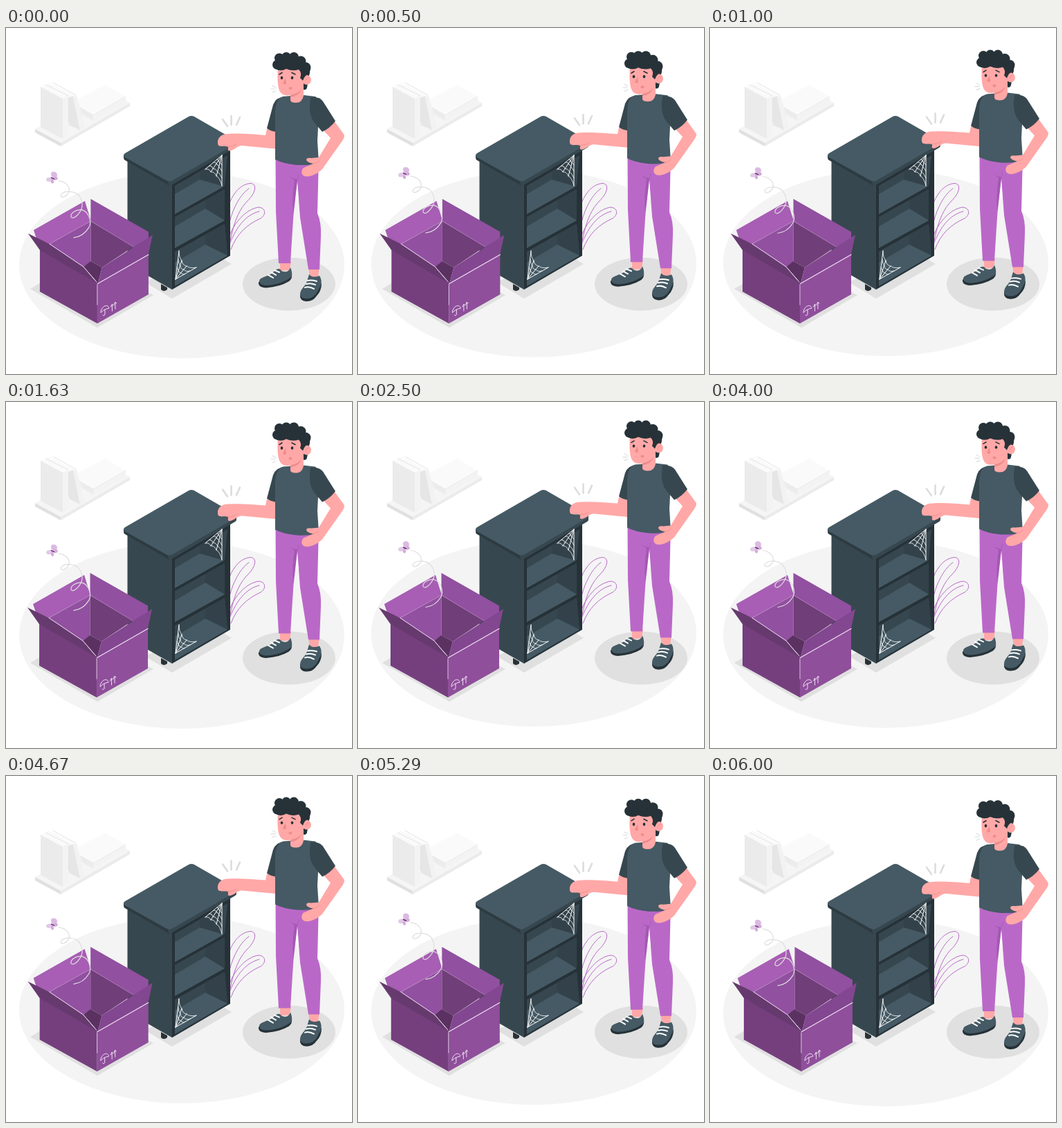
Recreate the animation shown at these times as an HTML page. Size 500 by 500 pixels, loop 6040 ms.

```html
<!DOCTYPE html>
<html lang="en">
<head>
<meta charset="utf-8">
<title>Old cabinet</title>
<style>
html, body { margin: 0; width: 100%; height: 100%; overflow: hidden; background: #fff; }
svg { display: block; width: 100vw; height: 100vh; }
.line { fill: none; stroke-linecap: round; stroke-linejoin: round; }
</style>
</head>
<body>
<svg viewBox="0 0 500 500">
  <ellipse id="ground" cx="254" cy="342.5" rx="235" ry="135" fill="#f4f4f4"/>

  <g id="bookshelf">
    <path fill="#f5f5f5" d="M42 146 142 88 179 108 79 166Z"/>
    <path fill="#e0e0e0" d="M42 146 79 166V171L42 151Z"/>
    <path fill="#ebebeb" d="M79 166 179 108V113L79 171Z"/>
    <path fill="#fafafa" d="M50 85 62 79 101 98 90 105 82 102Z"/>
    <path fill="#ebebeb" d="M50 85 82 102V160L50 143Z"/>
    <path fill="#f3f3f3" d="M82 102 90 98V155L82 160Z"/>
    <path class="line" stroke="#e4e4e4" d="M58 82 90 98M68 79 101 97"/>
    <path fill="#e2e2e2" d="M90 100 104 143 90 136Z"/>
    <path fill="#e6e6e6" d="M90 101 97 98 107 148 91 140Z"/>
    <path fill="#f2f2f2" d="M97 99 102 97 114 144 107 148Z"/>
    <path fill="#fafafa" d="M103 103 143 82 173 99 126 126 107 115Z"/>
    <path fill="#ececec" d="M107 115 126 126V134L109 124Z"/>
    <path fill="#f3f3f3" d="M126 126 173 99V108L126 134Z"/>
    <path class="line" stroke="#e8e8e8" stroke-width=".8" d="M107 115 126 126 173 99"/>
  </g>

  <path fill="#e0e0e0" d="M200 367 240 391 326 341 300 325Z"/>
  <path fill="#e0e0e0" d="M35 377 60 362 180 368 213 386 132 433Z"/>
  <ellipse cx="409" cy="370" rx="67" ry="38.5" fill="#e0e0e0"/>

  <g class="line" stroke="#ba68c8" stroke-width="1">
    <path d="M323 253C328 240 338 226 353 224.500 364 225 361 239 347 252 334 266 328 288 324 307"/>
    <path d="M323 281C328 260 339 240 351 232"/>
    <path d="M324 298C330 282 346 262 365 259 376 260 376 270 368 275 348 284 333 298 325 320"/>
    <path d="M324 310C333 288 346 270 366 265"/>
  </g>

  <g id="cabinet">
    <path fill="#263238" d="M224 370 233 375V378Q228 382 224 378Z"/>
    <path fill="#37474f" d="M175.500 190 240 226V378L175.500 341Z"/>
    <path fill="#263238" d="M240 222 324 176V329L240 378Z"/>
    <path fill="#37474f" d="M244 228 320 184 316 228 244 268Z"/>
    <path fill="#33424a" d="M280 207 312 188V228L280 220Z"/>
    <path fill="#455a64" d="M244 240 280 219 315 229 244 269Z"/>
    <path fill="#37474f" d="M244 273 316 233V278L244 318Z"/>
    <path fill="#33424a" d="M288 249 316 233V278L288 262Z"/>
    <path fill="#455a64" d="M244 287 288 261 316 278 244 318Z"/>
    <path fill="#37474f" d="M244 323 316 283 320 328 244 373Z"/>
    <path fill="#33424a" d="M288 299 316 283 320 328 288 313Z"/>
    <path fill="#455a64" d="M244 339 288 313 320 329 244 373Z"/>
    <path fill="#2d3b42" d="M170 183 236 220V228L172 191Q170 190 170 187Z"/>
    <path fill="#37474f" d="M234 221 333 164V170Q333 172 331 173L241 226Q238 228 235 227Z"/>
    <path fill="#455a64" d="M172 181 264 128Q268 126 272 128L331 162Q335 165 331 168L241 220Q236 223 231 220L172 187Q168 184 172 181Z"/>
    <g class="line" stroke="#fff" stroke-width="1">
      <path d="M312 184 288 204M312 184 296 208M312 184 304 214M312 184V228"/>
      <path stroke-width=".8" d="M294 199Q298 199 299 203 303 203 306 208 309 210 312 217M300 194Q304 194 304 197 307 197 308 201 310 203 312 207M305 190Q308 191 308 194 310 195 312 198M288 204Q294 203 296 208 301 207 304 214 309 216 312 228"/>
      <path d="M245 363 250 322M245 363 254 336M245 363 261 344M245 363 275 346"/>
      <path stroke-width=".8" d="M250 322Q250 332 254 336 255 343 261 344 266 348 275 346M249 334Q249 341 252 343 252 349 257 349 260 353 266 351M247 346Q248 349 249 350 250 354 253 354 255 357 258 356"/>
    </g>
  </g>

  <g id="man">
    <g class="line" stroke="#dcdcdc">
      <path stroke-width="2.6" d="M313 132 320 142M325.500 127V140M338 129 333 140"/>
      <path stroke-width="1.100" d="M385 83 390 86M383 88H389M385 93 390 91"/>
    </g>

    <path fill="#ffa8a7" d="M396 337H412L410 350 396 351ZM437 345H453L451 360 439 361Z"/>
    <path fill="#263238" d="M365 367Q364 375 376 375.500 396 374 409 366 414 362 413 356Z"/>
    <path fill="#455a64" d="M366 366C366 360 379 359 385 354 391 348 395 346 398 351 404 354 409 352 411 346Q414 353 413 359C406 366 389 372 375 372Q366 371 366 366Z"/>
    <path fill="#263238" d="M425 385Q424 394 433 395 443 396 449 387 456 380 456 369Z"/>
    <path fill="#455a64" d="M425 384C426 376 433 373 435 366L438 356Q443 362 453 358 457 364 455 372C451 377 449 391 434 391Q425 391 425 384Z"/>
    <path class="line" stroke="#fff" stroke-width="2" d="M379 357 386 361M383 353 390 357M388 350 395 353M432 375Q438 373 445 377M434 370Q440 368 447 371M436 365Q442 364 449 366"/>

    <path fill="#ba68c8" d="M389.500 187H452L450 268Q456 281 455 301L453 349H437L425 274 421 221 415.500 270Q415 277 414 292L411 340H394L390 265Z"/>
    <path fill="#a458b2" d="M403 211Q411 217 421 219L415 268Q413 246 417 220Z"/>
    <path class="line" stroke="#a458b2" stroke-width=".8" d="M421 220 423 212"/>

    <path fill="#ffa8a7" d="M377 146 375 155C354 153 337 152 321 153 311 153 305 159 306 167 307 173 313 170 319 171 324 172 318 177 323 177.500 330 177 334 170 341 170L389 174.500V147Z"/>
    <path class="line" stroke="#ed8d8b" stroke-width=".8" d="M319 171Q328 172 334 167"/>
    <path fill="#37474f" d="M403 99Q390 100 386 111L377 145Q382 149 390 150Z"/>
    <path fill="#455a64" d="M400 99 412 98Q420 107 430 97L447 99Q455 105 452 124L450 163 452 194Q443 199 420 198 400 196 389 190V120Q390 103 400 99Z"/>
    <path fill="#ffa8a7" d="M474 134 488.500 154Q490 157 486 163L457 204C449 212 439 215 433 214.500 426 213 426 206 430 202L444 196Q434 194 434 190 435 187 441 188L452 187 469 159 457 146Z"/>
    <path class="line" stroke="#ed8d8b" stroke-width=".8" d="M444 196Q449 195 452 192"/>
    <path fill="#37474f" d="M440 100Q453 99 458 106L476 134.500Q468 145 457 150L446 137Q438 127 439 111Z"/>

    <path fill="#263238" d="M425 58H440L435 86Q434 90 430 89Z"/>
    <path fill="#ffa8a7" d="M411 88 430 83V98Q428 108 419 108 411 108 411 104Z"/>
    <path fill="#ed8d8b" d="M411 96Q421 96 427 88 424 98 411 100Z"/>
    <path fill="#ffa8a7" d="M393 56Q391 84 396 92 400 99 410 97 423 95 430 83V58Z"/>
    <ellipse cx="434.500" cy="75" rx="6.500" ry="7" fill="#ffa8a7"/>
    <g id="hair" fill="#263238">
      <path d="M391 46 426 42 438 58 439 66Q432 67 429 76L425 72Q428 65 423 60 414 63 405 59 398 63 391 60Z"/>
    </g>
    <path fill="#ed8d8b" d="M404 72 400 80Q401 82 405 81Z"/>
    <ellipse cx="411" cy="87" rx="2.500" ry="2" fill="#ed8d8b"/>
    <ellipse cx="398.500" cy="72" rx="1.800" ry="2.200" fill="#263238"/>
    <ellipse cx="413.500" cy="72" rx="1.800" ry="2.200" fill="#263238"/>
    <path class="line" stroke="#263238" stroke-width="1.600" d="M395 67 399 64.500M413 64.500 418 67"/>
    <path class="line" stroke="#ed8d8b" stroke-width=".9" d="M433 76Q434 72 437 72"/>
  </g>

  <g id="box">
    <path fill="#a75eb4" d="M40 292 114 250 123 279 63 312 44 304Z"/>
    <path fill="#9150a0" d="M122.500 247 206 294.500V304L184 317 122.500 279Z"/>
    <path fill="#9150a0" d="M63 312 122.500 279V338L112 345Z"/>
    <path fill="#703e78" d="M122.500 279 184 316 139 346 122.500 337Z"/>
    <path class="line" stroke="#c99ad1" stroke-width=".6" d="M63 312 122.500 279 184 316"/>
    <path fill="#753f7e" d="M49 318 132 366V427L49 381Z"/>
    <path fill="#8f4f9b" d="M132 368 206 326V385L132 427Z"/>
    <path fill="#5b3162" d="M112 345 122.500 337 139 346 133 369Z"/>
    <path fill="#673a6f" d="M32 297 63 312 112 345 132 369 49 321Z"/>
    <path fill="#824790" d="M139 346 212 299 206 327 133 369Z"/>
    <g class="line" stroke="#f0e0f3">
      <path stroke-width="1" d="M63 312 112 345 131 367"/>
      <path stroke-width="1.200" d="M132.500 369.500 206 327.500"/>
      <path stroke-width=".8" d="M132 371V400"/>
      <path stroke-width="1" d="M137 411C137 403 147 397 149 405L145 406 141 408ZM143 407V414Q142 417 140 415M153.500 409V400M151.500 403 153.500 399 155.500 401M158 406V397M156 400 158 396 160 398"/>
    </g>
  </g>

  <g id="butterfly">
    <path class="line" stroke="#dedede" stroke-width="1.200" d="M76 221C86 222 93 229 91 237 88 244 79 247 79 242 82 235 95 235 103 240 110 246 112 256 108 264 103 272 97 277 94 273 93 268 101 262 110 263 120 266 124 280 120 288 114 298 107 302 98 303"/>
    <path fill="#dbb9e2" d="M67 217Q63 210 67 208 73 207 74 212 74 216 69 218Z"/>
    <path fill="#e3c8e8" d="M67 217Q60 214 58 219 58 223 64 222 68 221 68 218Z"/>
    <path fill="#d4acdc" d="M68 217Q73 213 75 217 74 221 70 220ZM67 218Q71 222 68 225 64 225 65 220Z"/>
    <path class="line" stroke="#5b3162" stroke-width="1.500" d="M65.500 216.500 69.500 218.500"/>
  </g>
</svg>
<script>
const LOOP = 6040;
const SHAKE = [0, -1, 2, -4, 4, -4, 4, -4, 2, -1, 0];
const part = id => document.getElementById(id);
const ground = part("ground"), man = part("man"), box = part("box"), butterfly = part("butterfly");

const curls = [[392, 53, 7], [395, 43.5, 7], [405, 42, 7], [416, 42, 7], [426, 48, 7.5], [433, 57, 7.5]];
for (const [cx, cy, r] of curls) {
  const curl = document.createElementNS("http://www.w3.org/2000/svg", "circle");
  Object.entries({ cx, cy, r }).forEach(([k, v]) => curl.setAttribute(k, v));
  part("hair").append(curl);
}

const phase = (t, period) => (t % period) / period;
const float = p => -10 * (1 - Math.abs(1 - 2 * p));

function shake(p) {
  const i = Math.floor(p * 10);
  return SHAKE[i] + (SHAKE[i + 1] - SHAKE[i]) * (p * 10 - i);
}

function move(el, x, y) {
  el.setAttribute("transform", `translate(${x.toFixed(3)} ${y.toFixed(3)})`);
}

function draw(now) {
  const t = now % LOOP + 12;
  const slow = float(phase(t, 6000)), quick = phase(t, 1500);
  move(ground, 0, slow);
  move(man, 0, slow);
  move(box, shake(quick), 0);
  move(butterfly, 0, float(quick));
}

const start = performance.now();
function tick() {
  draw(performance.now() - start);
  requestAnimationFrame(tick);
}
tick();
</script>
</body>
</html>
```
